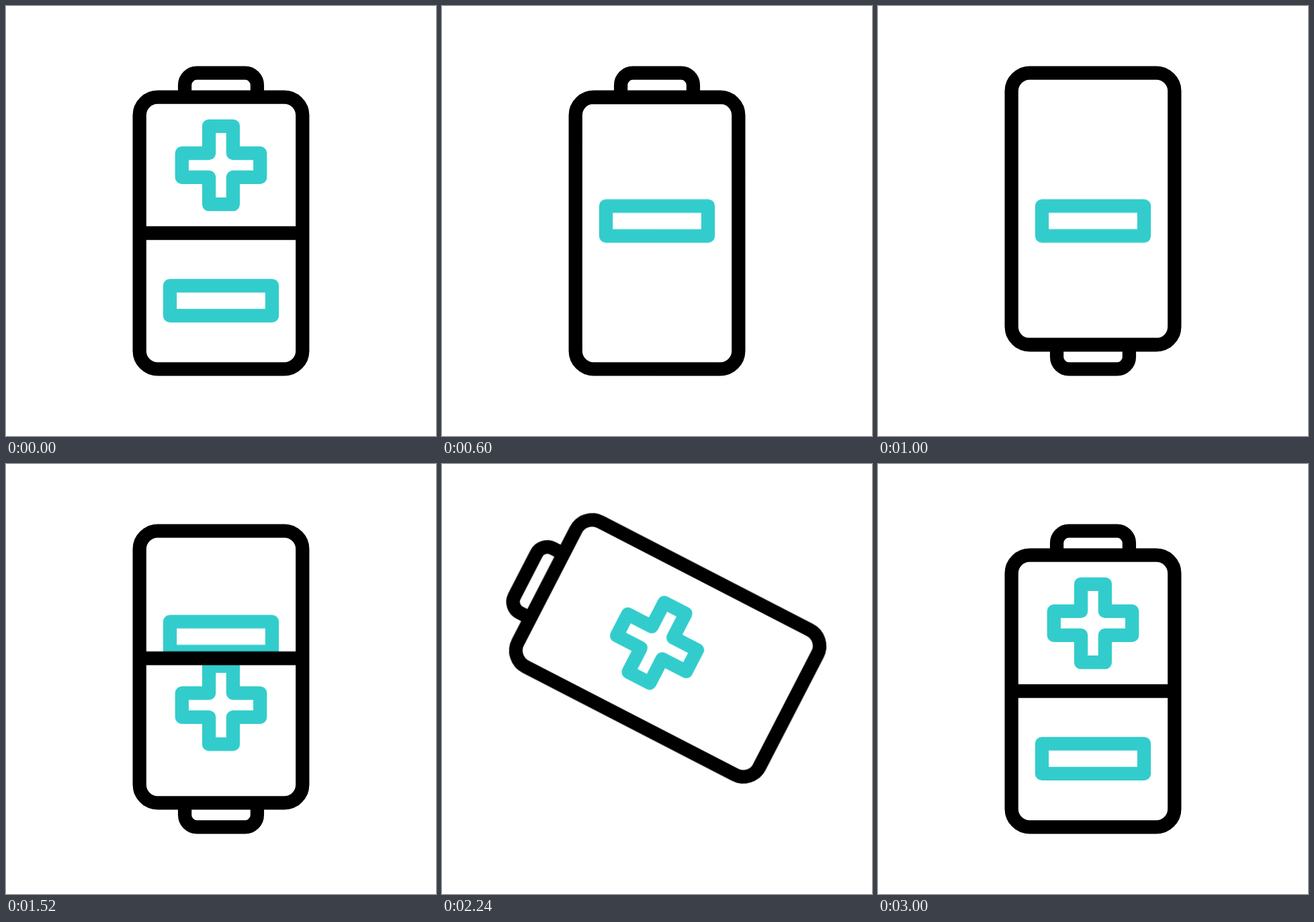
These frames come from a looping animation (640x640 px, 3220 ms). An HTML page without scripts:

```html
<!DOCTYPE html>
<html lang="en">
<head>
<meta charset="utf-8">
<title>Battery</title>
<style>
  html, body {
    margin: 0;
    width: 100%;
    height: 100%;
    overflow: hidden;
    background: #fff;
  }
  svg { display: block; width: 100%; height: 100%; }

  .ink, .sign { fill: none; stroke-width: 20.3; }
  .ink { stroke: #000; }
  .sign { stroke: #33cccc; stroke-linejoin: round; }

  .hop, .spin, .divider, .plus, .minus {
    animation: 3220ms cubic-bezier(.3333, 0, .6667, 1) infinite;
  }
  .hop { animation-name: hop; animation-timing-function: cubic-bezier(.38, 0, .667, 1); }
  .spin { animation-name: spin; transform-origin: 320px 320px; }
  .divider { animation-name: divider; }
  .plus { animation-name: plus; }
  .minus { animation-name: minus; }

  /* Stops: 0.6 s, 0.8 s, 1 s, 2 s, 2.2 s, 2.4 s, 3 s */
  @keyframes hop {
    0%, 18.634% { transform: translateY(0); }
    24.845% {
      transform: translateY(-60.8px);
      animation-timing-function: cubic-bezier(.333, 0, .62, 1);
    }
    31.056%, 62.112% { transform: translateY(0); }
    68.323% {
      transform: translateY(-60.8px);
      animation-timing-function: cubic-bezier(.333, 0, .62, 1);
    }
    74.534%, 100% { transform: translateY(0); }
  }
  @keyframes spin {
    0%, 18.634% { transform: rotate(0deg); }
    31.056%, 62.112% { transform: rotate(180deg); }
    74.534%, 100% { transform: rotate(360deg); }
  }
  @keyframes divider {
    0% { transform: translateY(0); }
    18.634%, 31.056% { transform: translateY(-202.3px); }
    62.112%, 74.534% { transform: translateY(202.3px); }
    93.168%, 100% { transform: translateY(0); }
  }
  @keyframes plus {
    0%, 31.056% { transform: translateY(0); }
    62.112%, 74.534% { transform: translateY(83px); }
    93.168%, 100% { transform: translateY(0); }
  }
  @keyframes minus {
    0% { transform: translateY(0); }
    18.634%, 31.056% { transform: translateY(-118.6px); }
    62.112%, 100% { transform: translateY(0); }
  }
</style>
</head>
<body>
<svg viewBox="0 0 640 640">
  <defs>
    <clipPath id="inside">
      <rect x="198.7" y="135.7" width="242.6" height="404.6" rx="27"/>
    </clipPath>
    <clipPath id="above">
      <rect class="divider" x="190" y="-262" width="260" height="600"/>
    </clipPath>
    <clipPath id="below">
      <rect class="divider" x="190" y="338" width="260" height="600"/>
    </clipPath>
  </defs>
  <g class="hop">
    <g class="spin">
      <g clip-path="url(#above)">
        <path class="sign plus" d="M302.1 178.8h35.8v40.3h40.3v35.8h-40.3v40.3h-35.8v-40.3h-40.3v-35.8h40.3z"/>
      </g>
      <g clip-path="url(#below)">
        <rect class="sign minus" x="244" y="416.3" width="152" height="44.6"/>
      </g>
      <g clip-path="url(#inside)">
        <path class="ink divider" d="M198 338H442"/>
      </g>
      <path class="ink" d="M266.1 130V117.7a18 18 0 0 1 18-18h71.8a18 18 0 0 1 18 18V130"/>
      <rect class="ink" x="198.7" y="135.7" width="242.6" height="404.6" rx="27"/>
    </g>
  </g>
</svg>
</body>
</html>
```
